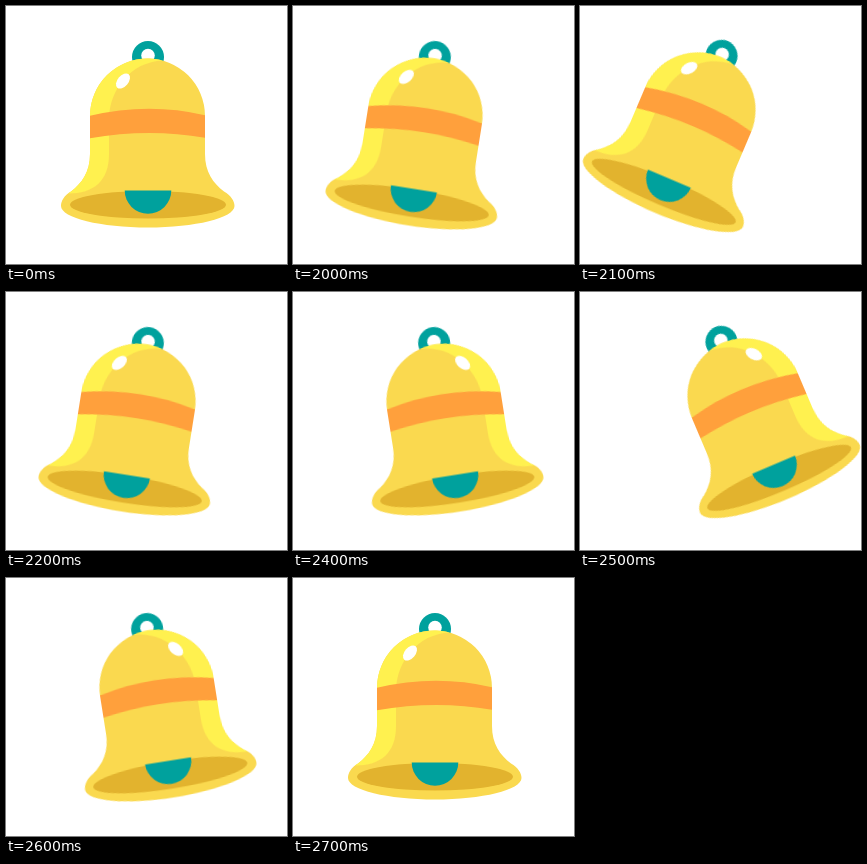
Write an HTML page that moves like this. It is 281 px wide and 258 px high and loops after 2.9 s.

```html
<!DOCTYPE html>
<html lang="en">
<head>
<meta charset="utf-8">
<title>Ringing bell</title>
<style>
  html, body { margin: 0; width: 100%; height: 100%; overflow: hidden; background: #fff; }
  svg { display: block; width: 100%; height: 100%; }

  .bell {
    --small: rotate(9deg);
    --big: translateY(-1.3px) rotate(23deg);
    transform-box: view-box;
    transform-origin: 141.5px 50px;
    animation: ring 2900ms step-end infinite;
  }

  /* Swings to the right are mirrored, so the shine changes sides. */
  @keyframes ring {
    0%      { transform: none; }
    68.965% { transform: var(--small); }
    72.413% { transform: var(--big); }
    75.862% { transform: var(--small); }
    79.310% { transform: none; }
    82.758% { transform: scaleX(-1) var(--small); }
    86.206% { transform: scaleX(-1) var(--big); }
    89.655% { transform: scaleX(-1) var(--small); }
    93.103%, 100% { transform: none; }
  }

  .teal { fill: #00a19d; }
  .body { fill: #fad94f; }
  .shine { fill: #fff14f; }
  .band { fill: #ffa03c; }
  .mouth { fill: #e2b32e; }
</style>
</head>
<body>
<svg viewBox="0 0 281 258" role="img" aria-label="Ringing bell">
  <g class="bell">
    <circle class="teal" cx="142" cy="51" r="16"/>
    <circle cx="142" cy="49.5" r="6.8" fill="#fff"/>
    <path class="body" d="M84 110A57.5 57.5 0 0 1 199 110V148C199 166 207 177 218 185.5C225 189.5 228.5 195 228.5 200C228.5 212 189 221.5 142 221.5S55 212 55 200C55 195 58 189.5 65 185.5C76 177 84 166 84 148Z"/>
    <path class="shine" d="M84 110A57.5 57.5 0 0 1 157 54.6C124 56 104 84 103 112V148C103 175 88 187.5 62 187.5L65 185.5C76 177 84 166 84 148Z"/>
    <path class="band" d="M84 109.8Q142 96 199 109.2V131.7Q142 122 84 132.3Z"/>
    <ellipse cx="117" cy="75" rx="8.8" ry="5.4" fill="#fff" transform="rotate(-50 117 75)"/>
    <ellipse class="mouth" cx="142" cy="198.7" rx="78" ry="13.8"/>
    <path class="teal" d="M118.7 184.4H165.3A23.3 23.3 0 0 1 118.7 184.4Z"/>
  </g>
</svg>
</body>
</html>
```
